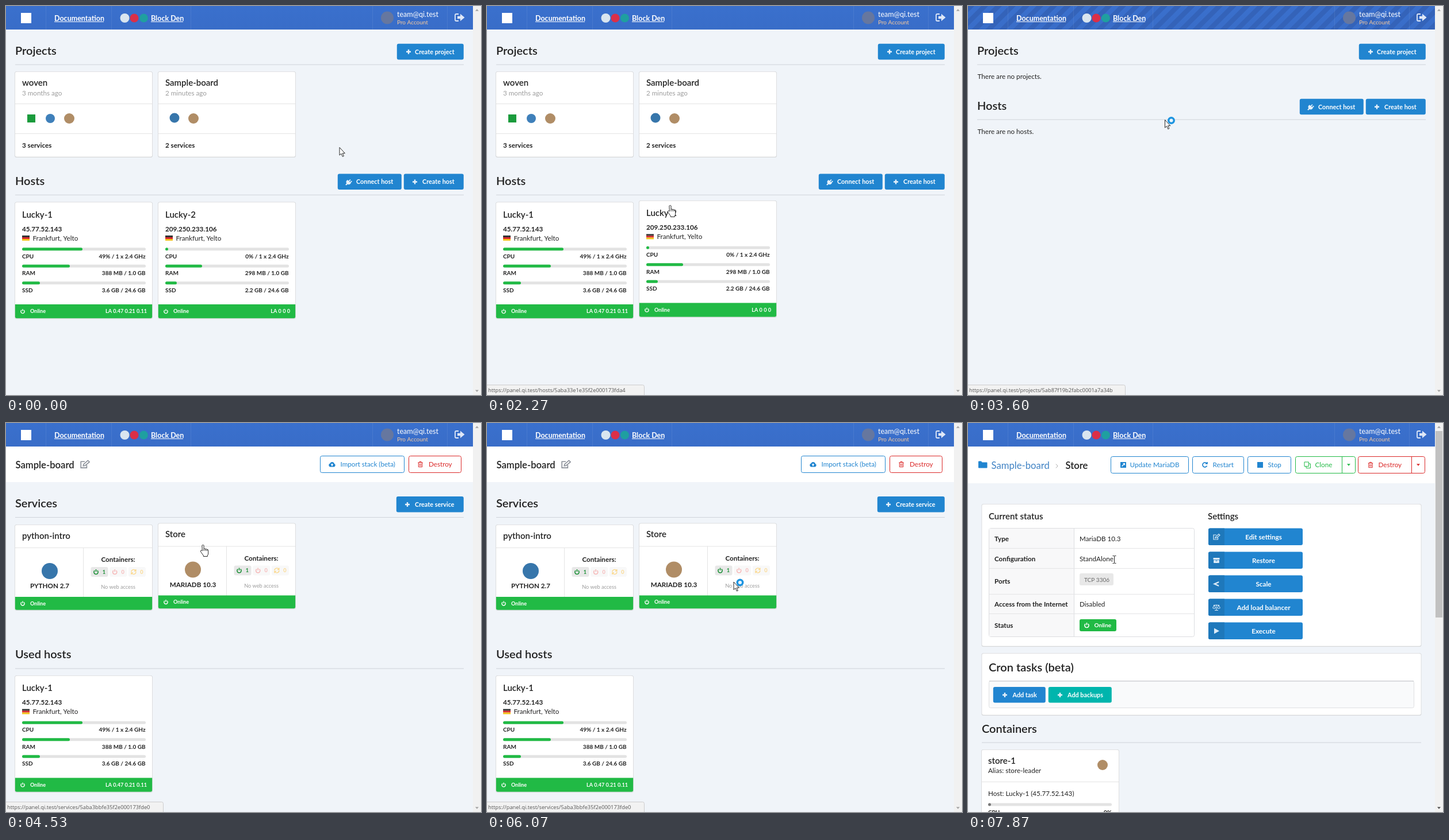
An HTML page with a canvas that plays this animation: 826 px wide and 678 px high, repeating every 8000 ms.

```html
<!DOCTYPE html>
<html lang="en">
<head>
<meta charset="utf-8">
<title>Hosting panel walkthrough</title>
<style>
  html, body { margin: 0; width: 100%; height: 100%; overflow: hidden; background: #f0f4f9; }
  canvas { display: block; }
</style>
</head>
<body>
<canvas id="stage" width="826" height="678"></canvas>
<script>
const ctx = document.getElementById('stage').getContext('2d');
const LOOP = 8000;
const INK = '#212121', BLUE = '#2185d0', GREEN = '#21ba45', RED = '#db2828', LINE = '#d4d6da';
const SEAL = '#b08d66', PYTHON = '#3776ab';
const BODY = 11.67;

// Icon outlines around the origin: [path, stroke width or 0 for filled]
const ICONS = {
  plus: ['M-4 0H4M0-4V4', 2.4],
  power: ['M-2.2-2.4a3.6 3.6 0 1 0 4.4 0M0-4.4V-.3', 1.6],
  sync: ['M3.5-2A4 4 0 0 0-4 0M-3.5 2A4 4 0 0 0 4 0M4-4.5v3h-3M-4 4.5v-3h3', 1.4],
  plug: ['M-6 5l2.3-2.3q-1.8-3.2.5-5.2l1.2-1 1.7 1.7 2.6-2.6 1.2 1.2-2.6 2.6 1.2 1.2 2.6-2.6 1.2 1.2-2.6 2.6.6.6-1.2 1.2q-2 2-4.7.4l-2 2z', 0],
  cloud: ['M-3.4 4.4h6.6a2.9 2.9 0 0 0 .8-5.5a4 4 0 0 0-7.5-.5a3.1 3.1 0 0 0 .1 6zM0-1.6l2.5 2.6h-1.6v2h-1.8v-2h-1.6z', 0],
  trash: ['M-4.2-3H4.2M-1.5-3V-4.6H1.5V-3M-3.2-3V4.6H3.2V-3M-1.1-1V3M1.1-1V3', 1],
  edit: ['M2.5 1V4.5H-5V-3.5H0M-2 2L-1.5 0 4-5 6-3 .3 1.7z', 1.2],
  update: ['M-5-5h10v10h-10zM-3 2l3.5-3.5-1.5-1.5h4v4l-1.5-1.5-3.5 3.5z', 0],
  restart: ['M3.6 1.5A4 4 0 1 1 3-2.8M4-5v3h-3', 1.7],
  stop: ['M-5-5h10v10h-10z', 0],
  clone: ['M-5-5h7.5v7.5h-7.5zM-2 2.5v3h7.5v-7.5h-3', 1],
  caret: ['M-3-1.7h6l-3 3.4z', 0],
  folder: ['M-8-5.5q0-1 1-1h4l1.5 2h8q1 0 1 1v8q0 1-1 1h-13.5q-1 0-1-1z', 0],
  archive: ['M-5.5-4.5h11v3h-11zM-4.8-.8h9.6v5.3h-9.6zM-1.5.3h3v1h-3z', 0],
  share: ['M4-3.2L-3.4 0 4 3.2M3.4-3.2h.9M-4-.1h.9M3.4 3.2h.9', 2.2],
  balance: ['M0-5V5M-3 5H3M-5-4H5M-4-4l-2.4 5q2.4 2 4.8 0zM4-4l-2.4 5q2.4 2 4.8 0z', 1],
  play: ['M-4-5l9 5-9 5z', 0],
  door: ['M-2-6h-4q-2 0-2 2v8q0 2 2 2h4', 1.8],
  exit: ['M-4-2.3h5v-4l7.5 6.3-7.5 6.3v-4h-5z', 0],
  chevron: ['M-2-3.5l3 3.5-3 3.5', 1],
};
const path = d => new Path2D(d);
const ARROW = path('M0 0V13.6L3 10.8 5.3 16 7.4 15.1 5.2 10.2H9.4z');
const HAND = path('M-1.6 1.4q1.6-2 3.2 0v6q1.6-1 3 .4 1.6-.8 2.6.6 2-.2 2 1.6v5q0 2.5-1.4 4v1.5h-7v-1.5l-4.6-6.5q-1-2 .6-2.6 1-.2 2 1z');
const FINGERS = path('M1.6 7.5v3.5M4.5 8v3M7 8.5v2.5');
const BEAM = path('M-3-6.5h2.2q.8 0 .8 1V5.5q0 1-.8 1H-3M3-6.5H.8q-.8 0-.8 1M3 6.5H.8q-.8 0-.8-1');

function text(str, x, y, { size = BODY, bold = false, color = INK, align = 'left', font = 'Lato' } = {}) {
  const weight = bold ? (size >= 15 ? 600 : 700) : 400;
  ctx.font = `${weight} ${size}px "${font}", sans-serif`;
  ctx.fillStyle = color;
  ctx.textAlign = align;
  ctx.fillText(str, x, y + size * 0.36);   // y is the middle of the capitals
}
function rect(x, y, w, h, color) {
  ctx.fillStyle = color;
  ctx.fillRect(x, y, w, h);
}
function box(x, y, w, h, { fill, stroke, r = 3 } = {}) {
  ctx.beginPath();
  ctx.roundRect(x, y, w, h, r);
  if (fill) { ctx.fillStyle = fill; ctx.fill(); }
  if (stroke) { ctx.strokeStyle = stroke; ctx.lineWidth = 1; ctx.stroke(); }
}
function disc(x, y, r, color) {
  ctx.beginPath();
  ctx.arc(x, y, r, 0, 7);
  ctx.fillStyle = color;
  ctx.fill();
}
function icon(name, x, y, color = '#fff', scale = 1) {
  const [d, width] = ICONS[name];
  ctx.save();
  ctx.translate(x, y);
  ctx.scale(scale, scale);
  ctx.fillStyle = ctx.strokeStyle = color;
  ctx.lineWidth = width;
  if (width) ctx.stroke(path(d)); else ctx.fill(path(d), 'evenodd');
  ctx.restore();
}
function button(x, y, w, label, glyph, iconX, textX, fill = BLUE) {
  box(x - .2, y, w, 27.6, { fill });
  icon(glyph, iconX, y + 14, '#e6f1fa');
  text(label, textX, y + 14, { size: 10.83, bold: true, color: '#fff' });
}
function outlineButton(x, y, w, label, glyph, iconX, textX, color, splitX) {
  box(x + .5, y + .5, w - 1, 29, { fill: '#fff', stroke: color });
  icon(glyph, iconX, y + 15, color);
  text(label, textX, y + 15, { color });
  if (splitX) {
    rect(splitX, y, 1, 30, color);
    icon('caret', splitX + 12, y + 15, color);
  }
}
function panel(x, y, w, h) {
  box(x - 1, y, w + 1, h + 1, { fill: '#d6d7d9', r: 3.5 });
  box(x - .17, y + .83, w - .66, h - 1.1, { fill: '#fff' });
}
function heading(str, y, lineY, x = 16, right = 796) {
  text(str, x, y, { size: 20, bold: true });
  rect(x, lineY, right - x, 1, '#d0d4da');
}
function meter(x, y, fill, color) {
  box(x, y - 2.5, 215, 5, { fill: '#e3e3e3', r: 2.5 });
  box(x, y - 2.5, fill, 5, { fill: color, r: 2.5 });
}
function footer(x, y, h, load) {
  box(x - .17, y, 238.34, h, { fill: GREEN, r: [0, 0, 3, 3] });
  icon('power', x + 13, y + h / 2, '#fff', .88);
  const style = { size: 9.17, bold: true, color: '#fff' };
  text('Online', x + 26, y + h / 2, style);
  if (load) text(load, x + 229, y + h / 2, { ...style, align: 'right' });
}

function flag(x, y) {
  ['#333', '#d5262c', '#f3c31c'].forEach((c, i) => rect(x, y + i * 3, 13, 3, c));
}
function projectCard(x, lift, name, age, count) {
  const y = 114 - lift;
  panel(x, y, 239, 149);
  text(name, x + 12, y + 19.5, { size: 15, bold: true });
  text(age, x + 12, y + 37.5, { color: '#9c9c9c' });
  rect(x, y + 56, 238, 1, '#e4e4e4');
  rect(x, y + 108, 238, 1, '#e4e4e4');
  text(count + ' services', x + 12, y + 129, { bold: true });
}
function hostCard(x, y, name, ip, meters, load) {
  panel(x, y, 239, 203);
  text(name, x + 12, y + 22, { size: 15, bold: true });
  text(ip, x + 12, y + 47, { bold: true });
  flag(x + 12, y + 58.5);
  text('Frankfurt, Yelto', x + 30.5, y + 63);
  meters.forEach(([label, value, fill], i) => {
    const row = y + 82.3 + i * 29.5;
    meter(x + 12, row, fill, GREEN);
    text(label, x + 12, row + 12.3, { size: 10, bold: true });
    text(value, x + 226.5, row + 12.3, { size: 10, bold: true, align: 'right' });
  });
  footer(x, y + 178.5, 24.2, load);
}
const hostOne = y => hostCard(16, y, 'Lucky-1', '45.77.52.143', [
  ['CPU', '49% / 1 x 2.4 GHz', 105], ['RAM', '388 MB / 1.0 GB', 83], ['SSD', '3.6 GB / 24.6 GB', 31],
], 'LA 0.47 0.21 0.11');
const hostTwo = y => hostCard(265, y, 'Lucky-2', '209.250.233.106', [
  ['CPU', '0% / 1 x 2.4 GHz', 5], ['RAM', '298 MB / 1.0 GB', 64], ['SSD', '2.2 GB / 24.6 GB', 20],
], 'LA 0 0 0');

function serviceCard(x, lift, name, engine, mark) {
  const y = 177 - lift;
  panel(x, y, 239, 149);
  text(name, x + 12, y + 19.5, { size: 15, bold: true });
  rect(x, y + 40, 238, 1, '#e4e4e4');
  rect(x + 118, y + 40, 1, 87, '#e4e4e4');
  disc(x + 60, y + 81, 14, mark);
  text(engine, x + 60, y + 107, { bold: true, align: 'center' });
  text('Containers:', x + 179, y + 61, { bold: true, align: 'center' });
  [['power', '#1a8f35', '1', '#e8e8e8'], ['power', '#f6b9b9', '0', '#f8f8f8'], ['sync', '#fbd98f', '0', '#f8f8f8']]
    .forEach(([glyph, color, n, fill], i) => {
      const left = x + 131.5 + i * 32.7;
      box(left, y + 74, 30, 17, { fill });
      icon(glyph, left + 9, y + 82.5, color);
      text(n, left + 23, y + 82.5, { size: 9.17, bold: true, color, align: 'center' });
    });
  text('No web access', x + 179, y + 109, { size: 9.17, color: '#9c9c9c', align: 'center' });
  footer(x, y + 126, 22.8);
}

function hostButtons(y) {
  button(577, y, 111, 'Connect host', 'plug', 596, 609);
  button(692, y, 104, 'Create host', 'plus', 711, 724);
}
function homePage(t, loading) {
  heading('Projects', 78, 101.7);
  button(680, 65.8, 116, 'Create project', 'plus', 700, 711);
  if (loading) {
    text('There are no projects.', 16.5, 123);
    heading('Hosts', 174, 197.5);
    hostButtons(161.7);
    text('There are no hosts.', 16.5, 219);
    return;
  }
  projectCard(16, 0, 'woven', '3 months ago', 3);
  rect(37, 189, 14, 14, '#1a9b3c');
  disc(77, 196, 8, '#3f80ba');
  disc(110, 196, 9, SEAL);
  const lift = raise(t, 2670, 9000);
  projectCard(265, lift, 'Sample-board', '2 minutes ago', 2);
  disc(293, 195 - lift, 8.5, PYTHON);
  disc(326, 196 - lift, 9, SEAL);
  heading('Hosts', 305, 328.8);
  hostButtons(292.5);
  hostOne(341.5 - raise(t, 820, 1450));
  hostTwo(341.5 - raise(t, 1500, 2370));
}
function projectPage(t) {
  rect(0, 41, 812, 62, '#fff');
  text('Sample-board', 16.5, 73, { size: 16.67, bold: true });
  icon('edit', 137, 72, '#8a8f98', 1.35);
  outlineButton(546, 57, 147, 'Import stack (beta)', 'cloud', 567, 581.5, BLUE);
  outlineButton(700, 57, 92, 'Destroy', 'trash', 720.5, 735, RED);
  heading('Services', 140, 164);
  button(679, 128, 117, 'Create service', 'plus', 698, 711);
  serviceCard(16, 0, 'python-intro', 'PYTHON 2.7', PYTHON);
  serviceCard(265, raise(t, 3770, 9000), 'Store', 'MARIADB 10.3', SEAL);
  heading('Used hosts', 403, 427.5);
  hostOne(440);
}
function servicePage() {
  rect(0, 41, 812, 64, '#fff');
  icon('folder', 26, 73, BLUE);
  text('Sample-board', 40.5, 74, { size: 16.67, color: '#4183c4' });
  icon('chevron', 155, 75, '#aaa');
  text('Store', 169.5, 74, { size: 16.67, bold: true });
  outlineButton(248, 58, 136, 'Update MariaDB', 'update', 270, 281.5, BLUE);
  outlineButton(390, 58, 90, 'Restart', 'restart', 412, 425.5, BLUE);
  outlineButton(486, 58, 76, 'Stop', 'stop', 508, 521.5, BLUE);
  outlineButton(569, 58, 105, 'Clone', 'clone', 590, 603.5, GREEN, 650);
  outlineButton(678, 58, 117, 'Destroy', 'trash', 700, 713.5, RED, 771);

  panel(24.5, 141, 764, 248);
  text('Current status', 36, 163, { size: 15, bold: true });
  box(36.5, 183.5, 357, 189, { fill: '#fff', stroke: '#dcdde0' });
  rect(37, 184, 148, 188, '#f8f8f9');
  rect(184, 184, 1, 188, '#dcdde0');
  for (const y of [218, 253, 298, 332]) rect(37, y, 356, 1, '#e4e4e6');
  [['Type', 202, 'MariaDB 10.3'], ['Configuration', 236.5, 'StandAlone'], ['Ports', 276],
   ['Access from the Internet', 316, 'Disabled'], ['Status', 353]].forEach(([label, y, value]) => {
    text(label, 46, y, { bold: true });
    if (value) text(value, 194, y);
  });
  box(194, 262, 59, 21, { fill: '#e8e8e8' });
  text('TCP 3306', 202, 273, { size: 10, color: '#666' });
  box(194, 342, 64, 21, { fill: GREEN });
  icon('power', 206.5, 352.5);
  text('Online', 219.5, 352.5, { size: 10, bold: true, color: '#fff' });

  text('Settings', 417, 163, { size: 15, bold: true });
  [['Edit settings', 'edit'], ['Restore', 'archive'], ['Scale', 'share'], ['Add load balancer', 'balance'], ['Execute', 'play']]
    .forEach(([label, glyph], i) => {
      const y = 183.5 + i * 41;
      box(418, y, 164, 29.5, { fill: BLUE });
      box(418, y, 28, 29.5, { fill: '#1e78bb', r: [3, 0, 0, 3] });
      icon(glyph, 432, y + 15, '#dcebf7');
      text(label, 514, y + 15, { bold: true, color: '#fff', align: 'center' });
    });

  panel(24.5, 401, 764, 108);
  text('Cron tasks (beta)', 36, 426, { size: 20, bold: true });
  box(36.5, 449.5, 739, 47, { fill: '#f9fafb', stroke: '#dfe0e2' });
  rect(37, 449, 738, 1.5, '#cfd1d4');
  button(44, 460, 91, 'Add task', 'plus', 64, 77.5);
  button(140, 460, 110, 'Add backups', 'plus', 160, 173, '#00b5ad');

  heading('Containers', 533, 556.5, 24, 788);
  panel(24, 569, 239, 140);
  text('store-1', 35, 589, { size: 15, bold: true });
  text('Alias: store-leader', 35, 606);
  disc(234, 596, 9, SEAL);
  rect(24, 625, 238, 1, '#e4e4e4');
  text('Host: Lucky-1 (45.77.52.143)', 35, 645.5);
  meter(35, 665, 5, '#777');
  text('CPU', 35, 678, { size: 10, bold: true });
  text('0%', 250, 678, { size: 10, bold: true, align: 'right' });
}

function header(t) {
  const shade = ctx.createLinearGradient(0, 0, 0, 41);
  shade.addColorStop(0, '#3a70cd');
  shade.addColorStop(1, '#396dc8');
  rect(0, 0, 812, 41, shade);
  const busy = [[3130, 3850], [6130, 6500], [6930, 7300]].some(([a, b]) => t >= a && t < b);
  if (busy) {
    ctx.save();
    ctx.beginPath();
    ctx.rect(0, 0, 812, 41);
    ctx.clip();
    ctx.beginPath();
    for (let x = -72 + (t * 0.035) % 24; x < 812; x += 24) {
      ctx.moveTo(x, 41);
      ctx.lineTo(x + 41, 0);
      ctx.lineTo(x + 53, 0);
      ctx.lineTo(x + 12, 41);
    }
    ctx.fillStyle = '#3463b9';
    ctx.fill();
    ctx.restore();
  }
  for (const x of [69, 183, 321, 637, 767]) rect(x, 0, 1, 41, 'rgba(255, 255, 255, .08)');
  rect(26, 12, 18, 18, '#fff');
  const link = { size: 12.5, bold: true, color: '#fff' };
  text('Documentation', 84, 21, link);
  rect(84, 27, 86, 1, '#fff');
  disc(206.5, 21, 8, '#d9e5ef');
  disc(223, 21, 7.5, '#db2f48');
  disc(239.5, 21, 7.5, '#1f9fa0');
  text('Block Den', 252, 21, link);
  rect(252, 27, 56, 1, '#fff');
  disc(663, 20.5, 11, '#66779f');
  text('team@qi.test', 680, 14.5, { size: 12.5, color: '#fff' });
  text('Pro Account', 680, 28, { size: 10, color: '#fbcb9b' });
  icon('door', 789, 20, '#dfe8f7');
  icon('exit', 789, 20, '#dfe8f7');
}
function scrollbar(scrollable) {
  rect(812, 0, 14, 678, '#f1f1f1');
  if (scrollable) rect(813, 14, 12, 325, '#c1c1c1');
  icon('caret', 819, 7, '#a3a3a3', -1);
  icon('caret', 819, 671, scrollable ? '#505050' : '#a3a3a3');
}

const SITE = 'panel.qi.test/';
const STATUS = [
  [1000, 'https://' + SITE + 'hosts/5aba32f8e35f2e000173fda1'],
  [1500, 'https://' + SITE + 'hosts/5aba33e1e35f2e000173fda4'],
  [2680, 'https://' + SITE + 'projects/5ab87f19b2fabc0001a7a34b'],
  [3800, 'https://' + SITE + 'services/5aba3bbfe35f2e000173fde0'],
  [6430, SITE + 'services/5aba3bbfe35f2e000173fde0/migrate'],
  [6930, ''],
];
function statusBar(t) {
  const current = STATUS.findLast(([start]) => t >= start);
  if (!current || !current[1]) return;
  ctx.globalAlpha = clamp((t - 930) / 200);
  box(-.5, 660.5, 274, 20, { fill: '#f2f2f2', stroke: '#cdcdcd', r: [0, 3, 0, 0] });
  text(current[1], 2, 669.5, { size: 9.3, color: '#555', font: 'Open Sans' });
  ctx.globalAlpha = 1;
}

// Pointer stops: [time, x, y]
const TRACK = [
  [130, 580, 246.5], [930, 232, 354], [1330, 232, 354], [1700, 318.5, 347], [2270, 318.5, 347], [3000, 342.5, 198.5],
  [3600, 342.5, 198.5], [3850, 342.5, 212], [4530, 342.5, 212], [5330, 352, 288], [5400, 352, 288], [5600, 429, 277],
  [6470, 429, 277], [6800, 314.5, 266], [6870, 314.5, 266], [7670, 220, 237.5], [7730, 220, 237.5], [7870, 254.5, 238],
];
// Pointer looks: each one lasts until the next
const LOOKS = [
  [0, 'arrow'], [820, 'hand'], [1450, 'arrow'], [1490, 'hand'], [2370, 'arrow'], [2670, 'hand'], [3130, 'busy'],
  [3800, 'hand'], [6000, 'busy'], [6430, 'hand'], [6540, 'arrow'], [7500, 'beam'],
];
const clamp = v => Math.max(0, Math.min(1, v));
const raise = (t, on, off) => 2.5 * (clamp((t - on) / 100) - clamp((t - off) / 100));

function pointerAt(t) {
  const i = TRACK.findIndex(([time]) => time > t);
  if (i === 0) return TRACK[0].slice(1);
  if (i < 0) return TRACK.at(-1).slice(1);
  const [t0, x0, y0] = TRACK[i - 1], [t1, x1, y1] = TRACK[i];
  const u = (t - t0) / (t1 - t0), k = u * u * (3 - 2 * u);
  return [x0 + (x1 - x0) * k, y0 + (y1 - y0) * k];
}
function pointer(t) {
  const look = LOOKS.findLast(([start]) => t >= start)[1];
  const shape = look === 'hand' ? HAND : look === 'beam' ? BEAM : ARROW;
  ctx.save();
  ctx.translate(...pointerAt(t));
  ctx.strokeStyle = '#111';
  ctx.lineWidth = .9;
  if (look !== 'beam') {
    ctx.fillStyle = '#fff';
    ctx.fill(shape);
  }
  ctx.stroke(shape);
  if (look === 'hand') ctx.stroke(FINGERS);
  if (look === 'busy') {
    disc(11, 1, 6.5, '#1d94e0');
    disc(11, 1, 3, '#e8f5fd');
  }
  ctx.restore();
}

function draw(now) {
  const t = now % LOOP;
  rect(0, 0, 826, 678, '#f0f4f9');
  if (t < 3750) homePage(t, t >= 3270);
  else if (t < 6430) projectPage(t);
  else servicePage();
  header(t);
  scrollbar(t >= 6430);
  statusBar(t);
  pointer(t);
}
const start = performance.now();
function tick() {
  draw(performance.now() - start);
  requestAnimationFrame(tick);
}
tick();
</script>
</body>
</html>
```
